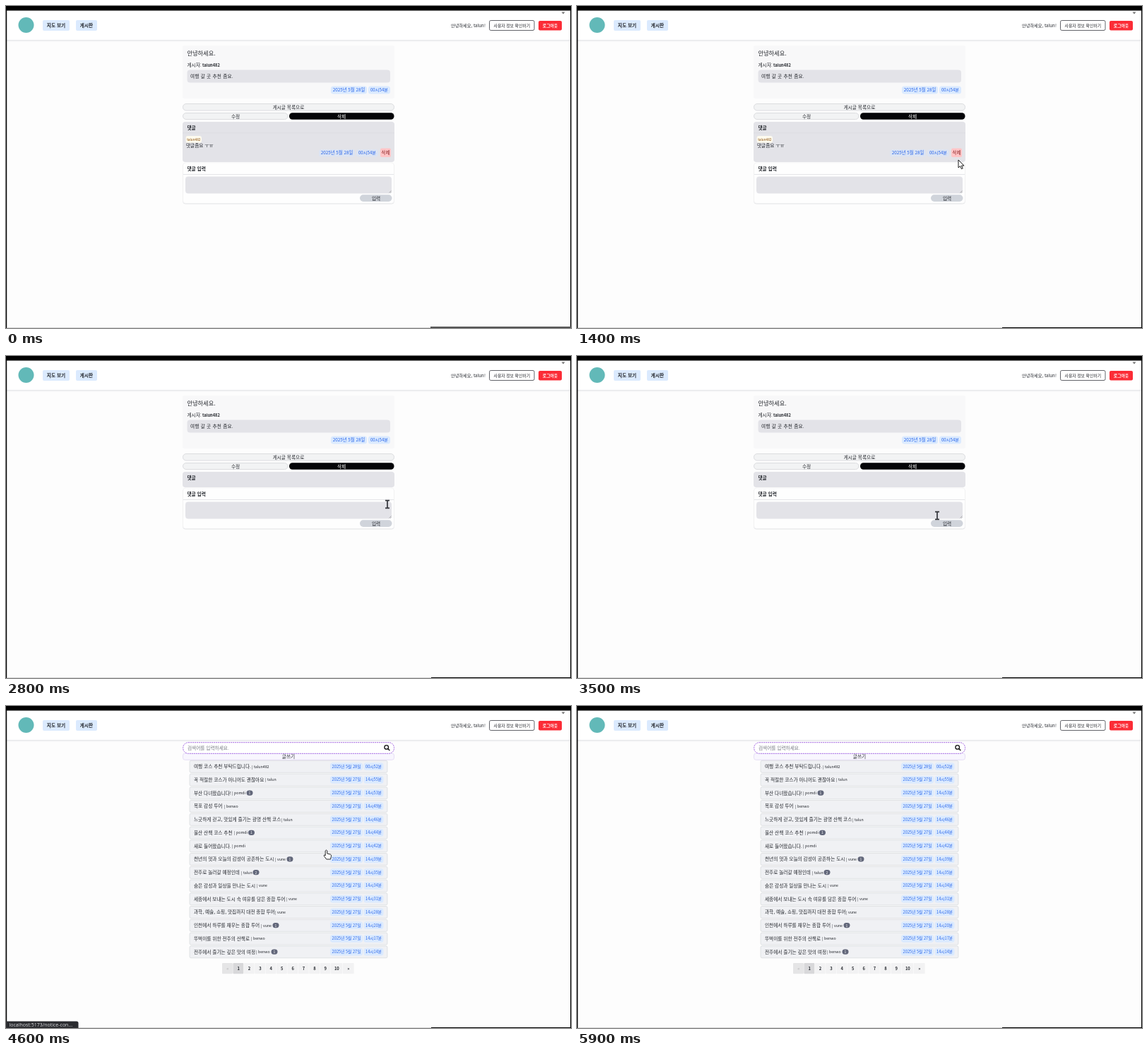
An HTML page that plays this animation: 800x456 px, repeating every 6.3 s.

```html
<!DOCTYPE html>
<html lang="ko">
<head>
<meta charset="utf-8">
<title>게시판</title>
<style>
  html, body { margin: 0; width: 100%; height: 100%; overflow: hidden; background: #fdfdfd; }
  svg { display: block; width: 800px; height: 456px; }
  text { font-family: "Noto Sans CJK KR", "Noto Sans CJK", "Open Sans", sans-serif; white-space: pre; }
</style>
</head>
<body>
<svg id="stage" viewBox="0 0 800 456" xmlns="http://www.w3.org/2000/svg"></svg>
<script>
const LOOP = 6300, STEP = 100;
const DELETED = 2800, LISTED = 4100;
const INK = '#24272d', FIELD = '#e3e3e8', CHIP = '#dbeafe', BLUE = '#2463eb';

const box = (x, y, w, h, fill, rx = 0, extra = '') =>
  `<rect x="${x}" y="${y}" width="${w}" height="${h}" fill="${fill}" rx="${rx}" ${extra}/>`;
const label = (x, y, str, { size = 6.67, fill = INK, weight = 400, anchor = 'start', spacing = 0 } = {}) =>
  `<text x="${x}" y="${y}" font-size="${size}" fill="${fill}" font-weight="${weight}" text-anchor="${anchor}" letter-spacing="${spacing}">${str}</text>`;
const centered = (x, y, str, opts = {}) => label(x, y, str, { anchor: 'middle', ...opts });
const group = (id, body, extra = '') => `<g id="${id}" ${extra}>${body}</g>`;
const outline = (color, width = 0.8) => `stroke="${color}" stroke-width="${width}"`;

function header() {
  return box(1, 48, 798, 1, '#e6e7e9') + box(1, 49, 798, 1.5, '#f3f3f5')
    + box(1, 7, 798, 41, '#fff')
    + '<circle cx="28.5" cy="27" r="11" fill="#62b9b8"/>'
    + box(52, 20, 38, 15, CHIP, 2) + centered(71, 30.2, '지도 보기', { weight: 700 })
    + box(99, 20, 30, 15, CHIP, 2) + centered(114, 30.2, '게시판', { weight: 700 })
    + label(630, 30.2, '안녕하세요, talun!', { size: 6.2 })
    + box(684.5, 20.5, 63.5, 14, '#fff', 2, outline('#3a3d45'))
    + centered(716.3, 29.7, '사용자 정보 확인하기', { size: 5.83 })
    + box(754, 21, 33, 13.5, '#fb2c36', 2)
    + centered(770.5, 29.8, '로그아웃', { size: 5.83, weight: 700, fill: '#fff' })
    + '<path d="M786.5 8.5h5l-2.5 3z" fill="#777"/>';
}

function postDate(y, fill) {
  return box(460, y, 51, 11, fill, 3.5) + centered(485.5, y + 7.9, '2025년 5월 28일', { size: 6.3, fill: BLUE })
    + box(513, y, 31, 11, fill, 3.5) + centered(528.5, y + 7.9, '00시54분', { size: 6.2, fill: BLUE });
}

function post() {
  return box(250, 56, 300, 75, '#f8f8f9', 3)
    + label(256.5, 69.8, '안녕하세요.', { size: 8.2 })
    + label(256.5, 85.5, '게시자:') + label(278, 85.5, 'talun482', { size: 5.7, weight: 700 })
    + box(256.5, 90.5, 287.5, 18, FIELD, 4)
    + label(261, 102, '여행 갈 곳 추천 좀요.', { spacing: 0.2 })
    + postDate(113.5, CHIP)
    + box(250.5, 138.5, 299, 9.5, '#f2f3f4', 4.5, outline('#d5d6da'))
    + centered(400, 145.7, '게시글 목록으로')
    + box(250.5, 151.5, 148.5, 9, '#f2f3f4', 4.5, outline('#d5d6da'))
    + centered(325, 158.5, '수정')
    + box(401, 151.3, 148.5, 9.4, '#050508', 4.5, 'id="deletePost"')
    + centered(475, 158.5, '삭제', { fill: '#fff' });
}

function comment() {
  return box(250, 179.5, 300, 0.6, '#d9d9df')
    + box(254.5, 184, 22.5, 9.8, '#fdfaee', 3)
    + centered(265.8, 191, 'talun482', { size: 4.7, fill: '#894b00' })
    + label(255, 200, '댓글좀요 ㅜㅠ')
    + box(443, 203, 51, 10.5, '#dce4f3', 3.5) + centered(468.5, 210.4, '2025년 5월 28일', { size: 6.3, fill: BLUE })
    + box(496, 203, 31, 10.5, '#dce4f3', 3.5) + centered(511.5, 210.4, '00시54분', { size: 6.2, fill: BLUE })
    + box(530, 201.5, 15, 12.5, '#ffc5c7', 2) + centered(537.5, 210.3, '삭제', { size: 6.4, fill: '#82181a' });
}

function commentForm() {
  return box(250.3, 222.5, 299.4, 58, '#e2e3e6', 4)
    + box(250.5, 222, 299, 57.5, '#fefefe', 4, outline('#eeeef0', 0.6))
    + label(256.5, 233.3, '댓글 입력', { weight: 700 })
    + box(251, 238, 298, 0.8, '#dedfe3')
    + box(254, 241.5, 292, 24, FIELD, 4)
    + `<path d="M542.5 264.5l3-3M544.2 264.8l1.5-1.5" ${outline('#777', 0.5)}/>`
    + box(501, 267.3, 45.5, 9.6, '#d0d4db', 4.8) + centered(524, 274.6, '입력');
}

// title, author, author x, minute of the afternoon hour, badge count, badge x
const ROWS = [
  ['여행 코스 추천 부탁드립니다.', 'talun482', 348, '00시52분'],
  ['꼭 적절한 코스가 아니어도 괜찮아요', 'talun', 367, 55],
  ['부산 다녀왔습니다!', 'pomdi', 320, 53, 1, 345],
  ['목포 감성 투어', 'benwo', 309, 49],
  ['느긋하게 걷고, 맛있게 즐기는 광명 산책 코스', 'talun', 390, 46],
  ['울산 산책 코스 추천', 'pomdi', 323, 44, 1, 347.5],
  ['새로 들어왔습니다.', 'pomdi', 320, 42],
  ['천년의 멋과 오늘의 감성이 공존하는 도시', 'vune', 381, 39, 1, 402],
  ['전주로 놀러갈 예정인데', 'talun', 333, 35, 2, 354],
  ['숨은 감성과 일상을 만나는 도시', 'vune', 355, 34],
  ['세종에서 보내는 도시 속 여유를 담은 종합 투어', 'vune', 397, 31],
  ['과학, 예술, 쇼핑, 맛집까지 대전 종합 투어', 'vune', 381, 28],
  ['인천에서 하루를 채우는 종합 투어', 'vune', 361, 20, 1, 382],
  ['뚜벅이를 위한 전주의 산책로', 'benwo', 347, 17],
  ['전주에서 즐기는 깊은 맛의 여정', 'benwo', 354, 14, 1, 380],
];

function row([title, author, authorX, time, count, badgeX], i) {
  const y = 77.3 + 18.75 * i;
  const day = i ? 27 : 28, clock = i ? `14시${time}분` : time;
  const date = { size: 5.67, fill: BLUE };
  let out = box(260, y, 280, 17, '#f0f1f4', 2, outline('#d6d8dc', 0.7))
    + label(266, y + 10.7, title)
    + label(authorX, y + 10.3, `| ${author}`, { size: 5.3 })
    + box(459, y + 3, 46, 10.6, CHIP, 3.5) + centered(482, y + 10.4, `2025년 5월 ${day}일`, date)
    + box(506.5, y + 3, 28, 10.6, CHIP, 3.5) + centered(520.5, y + 10.4, clock, date);
  if (count) out += box(badgeX - 4.5, y + 4.7, 9, 7.2, '#62677a', 3.6)
    + centered(badgeX, y + 10.2, count, { size: 5, fill: '#fff' });
  return out;
}

function pagination() {
  const names = ['«', 1, 2, 3, 4, 5, 6, 7, 8, 9, 10, '»'];
  let x = 306;
  return names.map((name, i) => {
    const w = i > 9 ? 16.6 : 15.4;
    const fill = i === 0 ? '#e5e5e6' : i === 1 ? '#d8d8da' : '#f2f2f3';
    const cell = box(x, 364, w - 0.5, 15.3, fill, 1)
      + centered(x + w / 2, 373.7, name, { size: 5.8, weight: 700, fill: i ? INK : '#b5b5b8' });
    x += w;
    return cell;
  }).join('');
}

function list() {
  return box(250.5, 67, 299, 9.3, '#f8f6fe', 3, outline('#ddd3f3', 0.7))
    + centered(400, 74.1, '글쓰기')
    + box(250.7, 51.7, 298.8, 15.6, '#fff', 7.5, outline('#9a55df', 0.9) + ' stroke-dasharray="2 1"')
    + label(257, 61.9, '검색어를 입력하세요.', { fill: '#777b83' })
    + `<g fill="none" ${outline('#111', 1.3)}><circle cx="538.7" cy="58.4" r="2.8"/><path d="M540.8 60.5l2.5 2.5"/></g>`
    + ROWS.map(row).join('') + pagination();
}

const CURSORS = {
  arrow: `<path d="M0 0V11L2.6 8.7 4.4 12.7 6.2 11.9 4.5 8.1H8Z" fill="#fff" ${outline('#000', 0.9)}/>`,
  hand: `<path d="M-1.3 1Q0-1 1.3 1V5l4.6 1.1Q7.2 6.6 7 8.5L6 13H.2L-3.2 8.4Q-3.5 6.7-2.1 6.9L-1.3 7.9Z" fill="#fff" ${outline('#111', 0.9)}/>`,
  beam: `<path d="M-3-5.3H3M0-5.3V5.3M-3 5.3H3" ${outline('#34363b', 1.7)}/>`,
};

const stage = document.getElementById('stage');
stage.innerHTML = box(0, 0, 800, 456, '#fdfdfd')
  + group('detail', post()
    + box(250, 164, 300, 57, FIELD, 4, 'id="commentPanel"')
    + label(256.5, 175.4, '댓글', { weight: 700 })
    + group('comment', comment()) + group('form', commentForm()))
  + group('list', list())
  + header()
  + box(0, 0, 800, 6.5, '#000') + box(0, 0, 1.2, 456, '#000') + box(799, 0, 1, 456, '#000')
  + box(1, 455.3, 601, 0.7, '#c9c9c9') + box(602, 455, 198, 1, '#000')
  + box(601, 454, 199, 2, '#555', 0, 'id="edge"')
  + group('status', box(-3, 446.5, 105.5, 14, '#2b2c30', 2.5)
    + `<text x="4.5" y="454" font-size="7" fill="#dcdde0" style="font-family:'Open Sans','Noto Sans',sans-serif">localhost:5173/notice-con...</text>`)
  + group('cursor', Object.entries(CURSORS).map(([kind, shape]) => group(kind, shape)).join(''));

const el = id => document.getElementById(id);
const show = (id, on) => el(id).setAttribute('visibility', on ? 'inherit' : 'hidden');

const smooth = u => u * u * (3 - 2 * u);
const easeIn = u => u * u;
const linear = u => u;

// time, x, y, easing towards this point
const PATH = [
  [400, 309, 445], [500, 302, 405], [600, 300, 389], [700, 300, 389],
  [1400, 540, 218, smooth], [1800, 537, 206, smooth], [2100, 537, 206],
  [2300, 539, 210], [2800, 540, 210], [3200, 540, 210],
  [3300, 538, 224], [3400, 526, 245], [3500, 510, 226], [3600, 494, 196],
  [3700, 484, 172], [3900, 476, 157], [4100, 476, 157],
  [4600, 453.5, 204, smooth], [4700, 397, 160], [4900, 346, 120], [5000, 346, 120],
  [5600, 560, 411, easeIn], [5700, 560, 411],
];

function cursorAt(t) {
  const i = PATH.findIndex(p => p[0] > t);
  if (i < 1) return null;
  const [t0, x0, y0] = PATH[i - 1], [t1, x1, y1, ease = linear] = PATH[i];
  const u = ease((t - t0) / (t1 - t0));
  return { x: x0 + (x1 - x0) * u, y: y0 + (y1 - y0) * u };
}

function cursorKind({ x, y }, t) {
  const inside = (l, top, r, b) => x >= l && x <= r && y >= top && y <= b;
  if (t >= LISTED) return inside(260, 77, 540, 358) || inside(306, 364, 494, 379) ? 'hand' : 'arrow';
  const shift = t < DELETED ? 0 : -35;
  if (inside(254, 241 + shift, 546, 265 + shift)) return 'beam';
  const onButton = inside(250, 138, 550, 161) || inside(501, 267 + shift, 546, 277 + shift)
    || (t < DELETED && inside(530, 201, 545, 214));
  return onButton ? 'hand' : 'arrow';
}

function render(time) {
  const t = Math.floor((time % LOOP) / STEP) * STEP;
  const listed = t >= LISTED, deleted = t >= DELETED;
  show('detail', !listed);
  show('list', listed);
  show('comment', !deleted);
  show('edge', t < 100);
  el('commentPanel').setAttribute('height', deleted ? 22 : 57);
  el('form').setAttribute('transform', `translate(0 ${deleted ? -35 : 0})`);
  show('status', t >= 4300 && t < 5900);
  el('status').setAttribute('opacity', t === 5800 ? 0.5 : 1);

  const pos = cursorAt(t);
  show('cursor', pos);
  const kind = pos && cursorKind(pos, t);
  for (const name in CURSORS) show(name, name === kind);
  if (pos) el('cursor').setAttribute('transform', `translate(${pos.x.toFixed(1)} ${pos.y.toFixed(1)})`);
  const hovered = kind === 'hand' && !listed && pos.y < 161;
  el('deletePost').setAttribute('fill', hovered ? '#1e2026' : '#050508');
}

const start = performance.now();
function tick() {
  render(performance.now() - start);
  requestAnimationFrame(tick);
}
tick();
</script>
</body>
</html>
```
